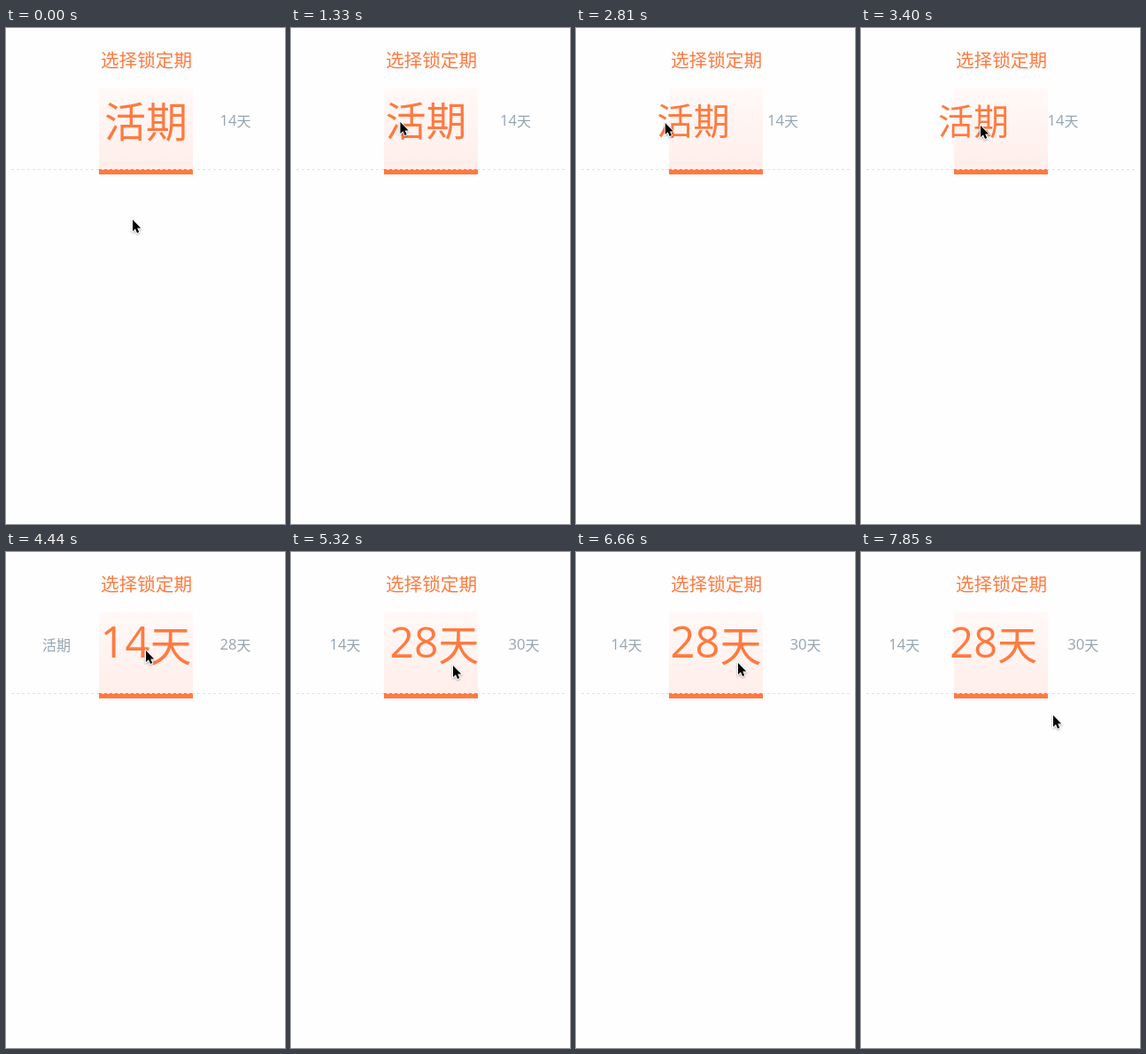
These frames come from a looping animation (315x559 px, 8 s). An HTML page:

```html
<!DOCTYPE html>
<html lang="zh-CN">
<head>
<meta charset="utf-8">
<title>选择锁定期</title>
<style>
html, body { margin: 0; width: 100%; height: 100%; overflow: hidden; background: #fefefe; }
svg { display: block; width: 315px; height: 559px; }
text { font-family: "Open Sans", "Noto Sans CJK SC", "Noto Sans CJK", sans-serif; text-anchor: middle; }
.title { font-size: 20.6px; font-weight: 500; fill: #ff7a40; }
.item { fill: #94a4b2; }
.item.on { fill: #ff7a40; font-weight: 300; }
.num { font-size: 1.04em; font-weight: 500; }
</style>
</head>
<body>
<svg viewBox="0 0 315 559">
  <defs>
    <linearGradient id="glow" x2="0" y2="1">
      <stop offset="0" stop-color="#fff9f8"/>
      <stop offset="1" stop-color="#ffeeea"/>
    </linearGradient>
    <clipPath id="strip"><rect x="6" y="60" width="304" height="110"/></clipPath>
    <filter id="shade" x="-50%" y="-50%" width="200%" height="200%">
      <feDropShadow dx="0" dy="1" stdDeviation="1" flood-opacity=".4"/>
    </filter>
  </defs>
  <text class="title" x="158.5" y="44">选择锁定期</text>
  <rect x="105" y="67" width="106" height="92" fill="url(#glow)"/>
  <rect x="105" y="159" width="106" height="6" fill="#ff7a40"/>
  <path d="M6 159.5H311" stroke="#dfe1e3" stroke-dasharray="3"/>
  <g id="items" clip-path="url(#strip)"></g>
  <path id="cursor" d="M0 0V13L3 10.3 5 15 7.2 14 5.2 9.4H9.2Z" fill="#000"
    stroke="#fff" stroke-width="1.6" paint-order="stroke" filter="url(#shade)"/>
</svg>
<script>
const LOOP = 8000, STEPS = 54, MID = 158, GAP = 101;
const SNAP = 1, RETURN = 3.5; // settling time in steps, to a new page or back

// Turning points of the pointer: step, x, y
const path = [
  [0, 143, 216], [8, 129, 106], [17, 79, 106], [18, 79, 106], [22, 166, 110],
  [24, 104, 110], [30, 158, 111], [32, 94, 112], [33, 179, 112], [35, 179, 112],
  [36, 183, 128], [41, 225, 113], [45, 183, 125], [49, 138, 166], [51, 138, 166], [53, 217, 184]
];

const drags = [
  { press: 8, release: 18, page: 0 },
  { press: 22, release: 24, page: 1 },
  { press: 30, release: 32, page: 2 },
  { press: 35, release: 41, page: 2 },
  { press: 45, release: 51, page: 2 }
];

const group = document.getElementById("items");
const cursor = document.getElementById("cursor");

function make(parent, tag, name, content = "") {
  const el = document.createElementNS("http://www.w3.org/2000/svg", tag);
  el.setAttribute("class", name);
  el.textContent = content;
  parent.append(el);
  return el;
}

// Digits sit a little above the baseline of the Chinese character
const items = ["活期", "14", "28", "30", "60"].map((label, i) => {
  const el = make(group, "text", "item", i ? "" : label);
  if (i) {
    make(el, "tspan", "num", label).setAttribute("dy", "-0.065em");
    make(el, "tspan", "unit", "天").setAttribute("dy", "0.0676em");
  }
  return el;
});

function pointer(step) {
  const i = Math.max(1, path.findIndex(p => p[0] >= step));
  const [s0, x0, y0] = path[i - 1], [s1, x1, y1] = path[i];
  const f = (step - s0) / (s1 - s0);
  return { x: x0 + (x1 - x0) * f, y: y0 + (y1 - y0) * f };
}

// The strip follows the pointer while pressed, then eases to a page
function scrollAt(step) {
  let home = 0, offset = 0;
  for (const { press, release, page } of drags) {
    if (step < press) break;
    offset = home * GAP + pointer(press).x - pointer(Math.min(step, release)).x;
    if (step > release) {
      const p = Math.min(1, (step - release) / (page === home ? RETURN : SNAP));
      offset += (page * GAP - offset) * p * (2 - p);
    }
    home = page;
  }
  return offset;
}

function draw(ms) {
  // The screen refreshes in even steps
  const step = Math.min(STEPS - 1, Math.floor((ms % LOOP + 14) * STEPS / LOOP));
  const offset = scrollAt(step);
  items.forEach((el, i) => {
    const shift = i * GAP - offset;
    const dist = Math.abs(shift);
    const on = dist < GAP / 2;
    const size = on ? 47 - 0.225 * dist : 16;
    el.setAttribute("class", on ? "item on" : "item");
    el.setAttribute("font-size", size);
    el.setAttribute("x", MID + shift);
    el.setAttribute("y", 105 + 0.375 * size);
  });
  const { x, y } = pointer(step);
  cursor.setAttribute("transform", `translate(${x} ${y})`);
}

const start = performance.now();
function tick() {
  draw(performance.now() - start);
  requestAnimationFrame(tick);
}
tick();
</script>
</body>
</html>
```
